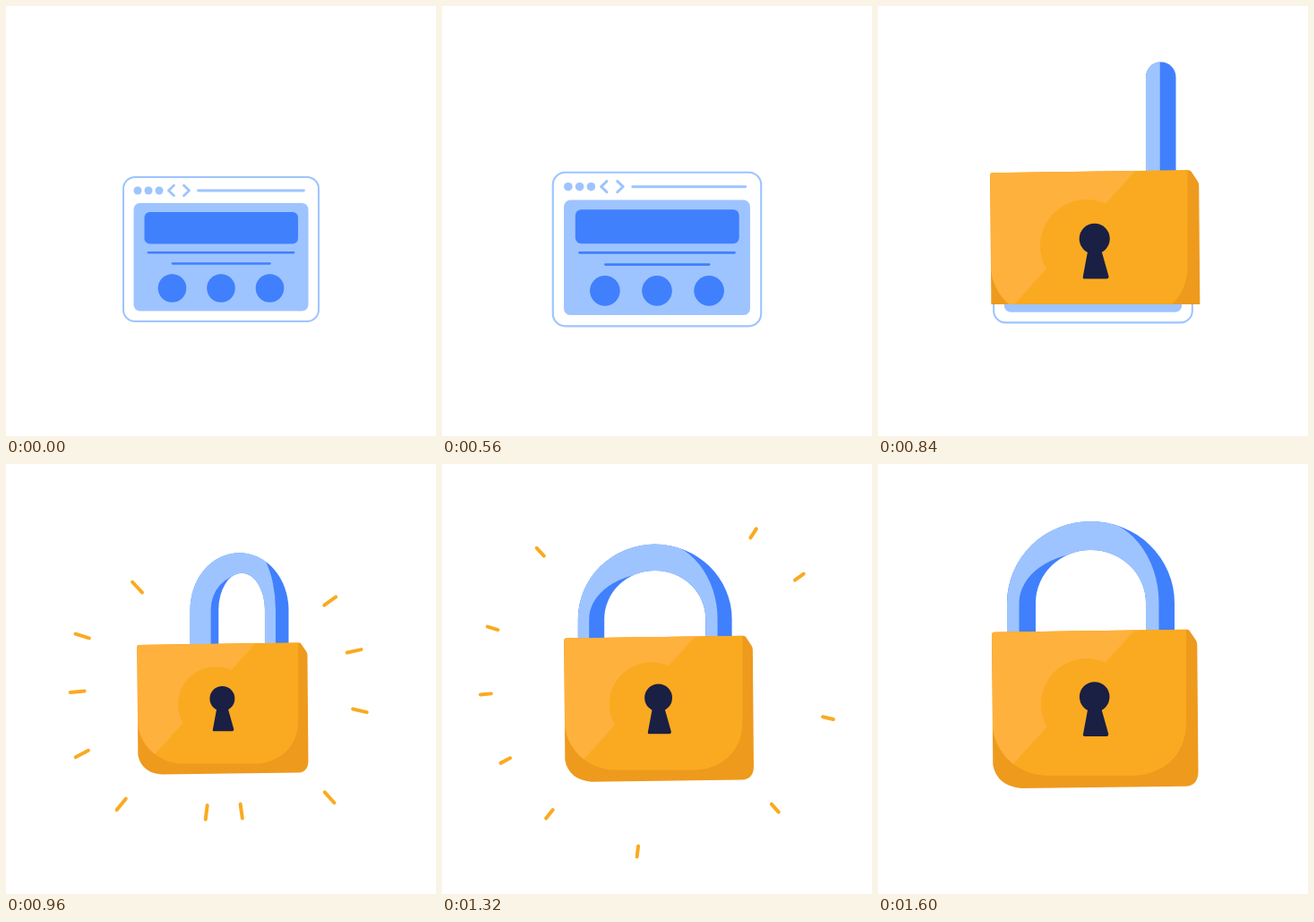
An HTML page with a canvas for the animation above (2880 ms loop, 480 by 480 pixels).

```html
<!DOCTYPE html>
<html lang="en">
<head>
<meta charset="utf-8">
<title>Secure page</title>
<style>
html, body { margin: 0; height: 100%; overflow: hidden; background: #fff; }
canvas { display: block; }
</style>
</head>
<body>
<canvas width="480" height="480"></canvas>
<script>
const ctx = document.querySelector('canvas').getContext('2d');
const LOOP = 2880, STEP = 40, CX = 240, CY = 271;
const SKY = '#9ec4ff', BLUE = '#4080fd', GOLD = '#faaa20', LIGHT = '#ffb13d',
  SHADE = '#ee9a1d', NAVY = '#1a1f44';

// Angle in degrees and first radius; the first two fade out, the last one fades in
const RAYS = [[82, 149], [-12, 150], [-133, 140], [-163, 164], [175, 163], [152, 178],
  [129, 180], [97, 150], [48, 178], [13, 157], [-36, 148], [-57, 160]];

const lerp = (a, b, u) => a + (b - a) * u;
const part = (t, from, to) => Math.min(1, Math.max(0, (t - from) / (to - from)));
const smooth = u => u * u * (3 - 2 * u);
const easeOut = (u, power) => 1 - (1 - u) ** power;

const zoom = t => 1 + .097 * smooth(part(t, 360, 680))
  - .277 * smooth(part(t, 760, 985)) + .18 * smooth(part(t, 1000, 1600));
const wipe = t => lerp(184, 365, part(t, 616, 890));
const sink = t => 125 * (1 - part(t, 658, 843)) + 9.6 * Math.sin(Math.PI * part(t, 1000, 1600));
const turn = t => easeOut(part(t, 840, 1080), 1.5);

function fill(path, color) {
  ctx.fillStyle = color;
  ctx.fill(path, 'evenodd');
}

function box(x, y, w, h, r) {
  const p = new Path2D();
  p.roundRect(x, y, w, h, r);
  return p;
}

function disc(x, y, r) {
  const p = new Path2D();
  p.arc(x, y, r, 0, Math.PI * 2);
  return p;
}

function line(color, width, ...pts) {
  ctx.beginPath();
  for (let i = 0; i < pts.length; i += 2) ctx.lineTo(pts[i], pts[i + 1]);
  ctx.strokeStyle = color;
  ctx.lineWidth = width;
  ctx.stroke();
}

function clipped(path, draw) {
  ctx.save();
  ctx.clip(path, 'evenodd');
  draw();
  ctx.restore();
}

function drawPage() {
  const frame = box(131, 191, 218, 161, 13);
  fill(frame, '#fff');
  ctx.strokeStyle = SKY;
  ctx.lineWidth = 2;
  ctx.stroke(frame);
  for (let i = 0; i < 3; i++) fill(disc(147 + 12 * i, 206, 4.5), SKY);
  for (const side of [-1, 1]) {
    const tip = 193 + 11.5 * side, end = tip - 6 * side;
    line(SKY, 2.8, end, 200.3, tip, 206, end, 211.7);
  }
  line(SKY, 2.8, 214.5, 206, 332.5, 206);
  fill(box(142.5, 220, 195, 120.5, 7), SKY);
  fill(box(154.5, 230, 171.5, 35.5, 6), BLUE);
  line(BLUE, 2.6, 159, 275.2, 321, 275.2);
  line(BLUE, 2.6, 186, 287.5, 294.5, 287.5);
  for (let i = -1; i < 2; i++) fill(disc(240 + 54.5 * i, 315, 15.8), BLUE);
}

function arch(p, left, right, apex, top, spring) {
  const foot = 200, half = Math.PI / 2;
  p.moveTo(left, foot);
  p.lineTo(left, spring);
  p.ellipse(apex, spring, apex - left, spring - top, 0, 2 * half, 3 * half);
  p.ellipse(apex, spring, right - apex, spring - top, 0, 3 * half, 4 * half);
  p.lineTo(right, foot);
  p.closePath();
}

// The bow swings around its right leg; its front face is light, its depth dark
function drawShackle(swing, drop) {
  const bulge = Math.sin(Math.PI * swing);
  const left = lerp(298, 144, swing), apex = (left + 331) / 2;
  const top = 64 + drop, spring = top + 16.5 + 74.5 * Math.sqrt(swing);
  const holeTop = Math.min(top + 18 + 14 * swing, spring);
  const rim = left + 13.5 + 16 * bulge, hole = rim + 18.5 - 9 * bulge;
  const back = new Path2D(), front = new Path2D();
  arch(back, left, 331, apex, top, spring);
  arch(front, left, 313.5, Math.min(apex, 313.5), top - 3 - 17 * bulge, spring);
  if (hole < 299) {
    const mid = (hole + 299) / 2;
    arch(back, hole, 299, mid, holeTop, spring);
    arch(front, rim, 299, mid, Math.min(holeTop + 2.5, spring), spring);
  }
  clipped(box(100, 0, 300, 190, 0), () => {
    fill(back, BLUE);
    clipped(back, () => fill(front, SKY));
  });
}

const body = new Path2D(`M130 187.7 L345 184.8 Q347 184.8 348 186.5 L355 197 Q356.3 199 356.3 202
  L357.5 345 Q356.5 359.5 343 359.7 L160 362 Q133 359.5 128.3 336 L127 191 Q127 187.7 130 187.7Z`);
const face = new Path2D(`M127 180 H344 V290 C344 325 318 348 283 348 H190
  C158 348 132 325 128 295Z`);
const sheen = new Path2D('M100 180 H291.5 L138 349 H100Z');
const slot = new Path2D('M234.5 272 H249 L257.3 301.5 Q257.3 304 255 304 H231 Q228.3 304 229 301.5Z');

function drawBody() {
  fill(body, SHADE);
  clipped(body, () => clipped(face, () => {
    fill(face, GOLD);
    fill(sheen, LIGHT);
    fill(disc(233, 268, 51), GOLD);
  }));
  fill(disc(241.7, 260, 16.8), NAVY);
  fill(slot, NAVY);
}

function drawRays(t) {
  const p = easeOut(part(t, 960, 1340), 2), fade = part(t, 1320, 1480);
  RAYS.forEach(([angle, near], i) => {
    const first = i < RAYS.length - 1 ? 16 : 0, last = i > 1 ? 12 : 0;
    const half = lerp(first, last, p) * (1 - fade) / 2;
    if (half < .5) return;
    const r = lerp(near, 194, p) + 8 * fade, a = angle * Math.PI / 180;
    const x = d => 242 + d * Math.cos(a), y = d => 240 + d * Math.sin(a);
    line(GOLD, 4, x(r - half), y(r - half), x(r + half), y(r + half));
  });
}

function draw(now) {
  const t = Math.floor(now % LOOP / STEP) * STEP, s = zoom(t);
  ctx.fillStyle = '#fff';
  ctx.fillRect(0, 0, 480, 480);
  ctx.lineCap = ctx.lineJoin = 'round';
  ctx.save();
  ctx.translate(CX, CY);
  ctx.scale(s, s);
  ctx.translate(-CX, -CY);
  if (t < 880) drawPage();
  if (t > 640) drawShackle(turn(t), sink(t));
  if (t > 600) clipped(box(100, 150, 300, wipe(t) - 150, 0), drawBody);
  ctx.restore();
  if (t >= 920 && t < 1480) drawRays(t);
}

const start = performance.now();
function tick() {
  draw(performance.now() - start);
  requestAnimationFrame(tick);
}
tick();
</script>
</body>
</html>
```
